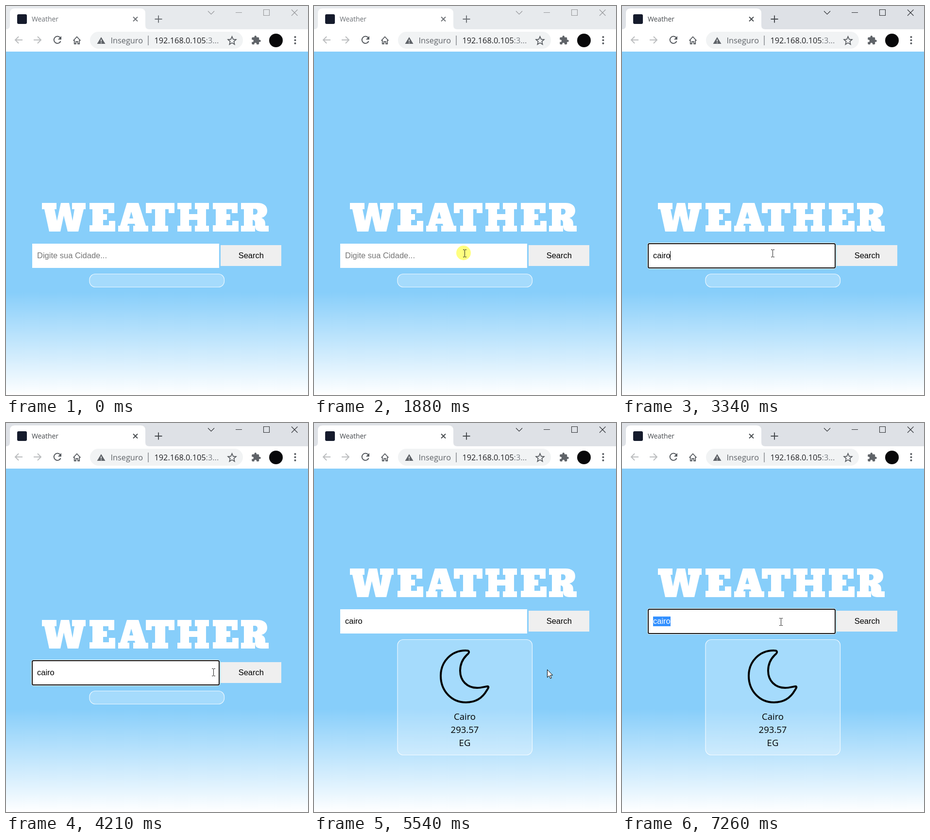
An HTML page that plays this animation: 622x802 px, repeating every 8000 ms.

```html
<!DOCTYPE html>
<html lang="pt">
<head>
<meta charset="utf-8">
<title>Weather</title>
<style>
  html, body { margin: 0; width: 100%; height: 100%; overflow: hidden; background: #fff; }
  svg { display: block; width: 622px; height: 802px; }
  .ui { font-family: "Open Sans", "Noto Sans", sans-serif; }
  .form { font: 16.5px "Liberation Sans", Arial, sans-serif; }
  .line { fill: none; stroke: currentColor; }
</style>
</head>
<body>
<svg viewBox="0 0 622 802" xmlns="http://www.w3.org/2000/svg">
  <defs>
    <linearGradient id="sky" x1="0" y1="0" x2="0" y2="1">
      <stop offset=".7" stop-color="#87cefa"/>
      <stop offset="1" stop-color="#fff"/>
    </linearGradient>
    <path id="letterE" d="M172 406H223V427H211V419H200V429H208V441H200V452H212V443H225V465H172V452H178V419H172Z"/>
  </defs>

  <!-- Tab strip -->
  <rect id="strip" width="622" height="48"/>
  <path fill="#fff" d="M0 48Q8 48 8 40V15Q8 5 18 5H277Q287 5 287 15V40Q287 48 295 48Z"/>
  <rect x="23" y="17" width="20" height="20" rx="3" fill="#151b2c"/>
  <g id="chrome">
    <text class="ui" x="53" y="32" font-size="13.9" fill="currentColor">Weather</text>
    <path class="line" stroke-width="1.9" d="M262 22.500l9 9M271 22.500l-9 9M306.500 27h15M314 19.500v15"/>
  </g>
  <path id="controls" class="line" stroke-width="1.1" d="M416 10.500l6.500 6.500 6.500-6.500M473 13.500h13M530.500 7.500h12v12h-12zM588 7.500l12.500 12.500M600.500 7.500L588 20"/>

  <!-- Toolbar -->
  <rect y="48" width="622" height="46" fill="#fff"/>
  <path class="line" color="#babcbe" stroke-width="1.9" d="M34 70H19M26 63l-7 7 7 7M57 70h15M65 63l7 7-7 7"/>
  <g color="#55595e" stroke-width="2">
    <path class="line" d="M111.500 65.200A7.200 7.200 0 1 0 112.600 72.500"/>
    <path fill="currentColor" d="M114 62v7.200h-7.200z"/>
    <path class="line" stroke-width="1.8" d="M138.500 71.500l7.500-8 7.500 8M140.800 70v8h3.200v-4.500h4v4.500h3.200v-8"/>
  </g>
  <rect x="173" y="53" width="315" height="35" rx="17.5" fill="#f1f3f4"/>
  <path fill="#5f6368" d="M196 64l8.500 14h-17z"/>
  <path stroke="#f1f3f4" stroke-width="1.6" d="M196 69v4.500M196 75v1.700"/>
  <g class="ui" font-size="16.3">
    <text x="215.500" y="77" fill="#5f6368">Inseguro</text>
    <text x="305.500" y="77" fill="#202124">192.168.0.105<tspan fill="#7b7f84">:3...</tspan></text>
  </g>
  <path stroke="#75797d" stroke-width="1.3" d="M293 61v20"/>
  <path class="line" color="#55595e" stroke-width="1.7" d="M465.500 63l2.400 5.600 6 .5-4.600 4 1.400 6-5.200-3.200-5.200 3.200 1.400-6-4.600-4 6-.5z"/>
  <path fill="#5f6368" transform="translate(504.500 60) scale(.88)" d="M20.500 11H19V7c0-1.100-.9-2-2-2h-4V3.500C13 2.120 11.880 1 10.500 1S8 2.120 8 3.500V5H4c-1.100 0-2 .9-2 2v3.800h1.500c1.500 0 2.700 1.200 2.700 2.700s-1.200 2.700-2.700 2.700H2V20c0 1.100.9 2 2 2h3.800v-1.500c0-1.500 1.200-2.700 2.700-2.700s2.700 1.200 2.700 2.700V22H17c1.100 0 2-.9 2-2v-4h1.500a2.500 2.500 0 0 0 0-5z"/>
  <circle cx="556" cy="71" r="14" fill="#08080a"/>
  <g fill="#55595e">
    <circle cx="595.500" cy="64" r="2"/><circle cx="595.500" cy="70.500" r="2"/><circle cx="595.500" cy="77" r="2"/>
  </g>

  <!-- Page -->
  <rect y="94" width="622" height="708" fill="url(#sky)"/>
  <g id="page">
    <g fill="#fff" fill-rule="evenodd" role="img" aria-label="WEATHER">
      <path d="M74 406H104V419H100L105 443 113 406H130L137 443 141 419H136V406H164V419H160L149 465H127L119 432 112 465H89L79 419H74Z"/>
      <use href="#letterE"/>
      <path d="M231 453H235L249 406H273L288 453H293V465H262V453H266L265 449H251L250 453H254V465H231ZM258 424L254 438H262Z"/>
      <path d="M288 406H347V427H335V419H328V453H334V465H301V453H307V419H300V427H288Z"/>
      <path d="M353 406H382V419H377V429H394V419H389V406H418V419H412V453H418V465H389V453H394V441H377V453H382V465H353V453H359V419H353Z"/>
      <use href="#letterE" x="254"/>
      <path d="M484 406H518C531 406 538 412 538 422 538 430 533 435 526 437 532 439 534 443 534 450V453H541V465H527C515 465 513 460 513 452V447C513 443 511 441 508 441V453H513V465H484V453H490V419H484ZM509 418V430H512C516 430 518 427 518 424 518 420 516 418 512 418Z"/>
    </g>
    <rect x="442" y="493" width="125" height="43" fill="#efefef"/>
    <rect x="54" y="490" width="385" height="50" fill="#fff"/>
    <g id="ring" fill="none">
      <rect x="52.500" y="488.500" width="388" height="53" rx="4" stroke="#fff"/>
      <rect x="54" y="490" width="385" height="50" rx="2.5" stroke="#101010" stroke-width="2"/>
    </g>
    <rect id="selection" x="64" y="505" width="36" height="20" fill="#3390ff"/>
    <text id="field" class="form" x="64" y="520"></text>
    <rect id="caret" y="505" width="1" height="19" fill="#000"/>
    <text class="form" x="504.800" y="520" text-anchor="middle">Search</text>
    <rect id="card" x="172" y="552.500" width="277.500" rx="12" fill="#fff" fill-opacity=".25" stroke="#fff" stroke-opacity=".85" stroke-width="1.2"/>
    <g id="result" transform="translate(0 106)">
      <path fill="none" stroke="#000" stroke-width="4" stroke-linejoin="round" d="M319 472C320 474 317 476 314 479 306 487 301 497 301 511 301 531 315 546 336 546 346 546 353 543 358 543 361 544 358 548 356 551 347 567 334 576 313 576 283 576 261 552 261 521 261 492 283 469 312 469 316 469 319 469 319 472Z"/>
      <g class="ui" font-size="18.5" text-anchor="middle">
        <text x="310.500" y="612">Cairo</text>
        <text x="310.500" y="639">293.57</text>
        <text x="310.500" y="666">EG</text>
      </g>
    </g>
  </g>

  <g id="pointer">
    <circle id="halo" r="15" fill="#ff0" fill-opacity=".5"/>
    <path id="arrow" fill="#fff" stroke="#000" d="M.5 .5V16.500L4.200 13 6.800 18.800 9.200 17.800 6.700 12H11.600Z"/>
    <path id="beam" fill="none" stroke="#222" d="M-1 -6.500H2M3 -6.500H6M2.500 -6V8M-1 8.500H2M3 8.500H6"/>
  </g>
</svg>

<script>
const LOOP = 8000, SHIFT = 106;
const el = {};
document.querySelectorAll("[id]").forEach(node => el[node.id] = node);

// Pointer paths: start, end, number of jumps, three curve points, easing power
const moves = [
  { from: 750, to: 1550, jumps: 12, pts: [[439, 792], [273, 583], [308, 509]], pow: 1.5 },
  { from: 3870, to: 4410, jumps: 7, pts: [[308, 509], [400, 518], [480, 508]], pow: 1.3 },
  { from: 6004, to: 6600, jumps: 9, pts: [[480, 508], [400, 456], [325, 409]], pow: 1.3 }
];
const keyTimes = [2470, 2730, 3000, 3210, 3340];
const caretX = [64, 72, 81, 85, 90, 99];

const within = (t, ...spans) => spans.some(([a, b]) => t >= a && t < b);
const show = (node, on) => node.setAttribute("visibility", on ? "visible" : "hidden");

function pointerAt(t) {
  const m = moves.filter(move => t >= move.from).pop() || moves[0];
  const raw = Math.min(1, Math.max(0, (t - m.from) / (m.to - m.from)));
  const step = Math.floor(raw * m.jumps + 1e-6) / m.jumps;
  const p = 1 - (1 - step) ** m.pow, q = 1 - p;
  return [0, 1].map(i =>
    Math.round(q * q * m.pts[0][i] + 2 * p * q * m.pts[1][i] + p * p * m.pts[2][i]));
}

function draw(t) {
  const active = within(t, [70, 350], [1950, LOOP]);
  el.strip.setAttribute("fill", active ? "#dee1e6" : "#e7eaed");
  el.chrome.setAttribute("color", active ? "#45494d" : "#6c7075");
  el.controls.setAttribute("color", active ? "#303236" : "#96989b");

  const found = t >= 5540;
  el.page.setAttribute("transform", `translate(0 ${found ? -SHIFT : 0})`);
  el.card.setAttribute("height", found ? 238 : 27);
  show(el.result, found);

  const focus = within(t, [1950, 4610], [6870, LOOP]);
  const selected = t >= 7070;
  const typed = keyTimes.filter(k => t >= k).length;
  el.field.textContent = typed ? "cairo".slice(0, typed) : "Digite sua Cidade...";
  el.field.setAttribute("fill", selected ? "#fff" : typed ? "#000" : "#757575");
  show(el.ring, focus);
  show(el.selection, selected);
  show(el.caret, focus && !selected && !within(t, [3870, 4410]));
  el.caret.setAttribute("x", caretX[typed]);

  const [x, y] = pointerAt(t);
  const top = found ? 490 - SHIFT : 490;
  const overField = x >= 54 && x < 439 && y >= top && y < top + 50;
  const visible = t >= 750;
  el.pointer.setAttribute("transform", `translate(${x} ${y})`);
  show(el.arrow, visible && !overField);
  show(el.beam, visible && overField);
  show(el.halo, within(t, [1880, 2140], [4610, 4810], [6870, 7260]));
}

const start = performance.now();
function tick() {
  draw((performance.now() - start) % LOOP);
  requestAnimationFrame(tick);
}
tick();
</script>
</body>
</html>
```
